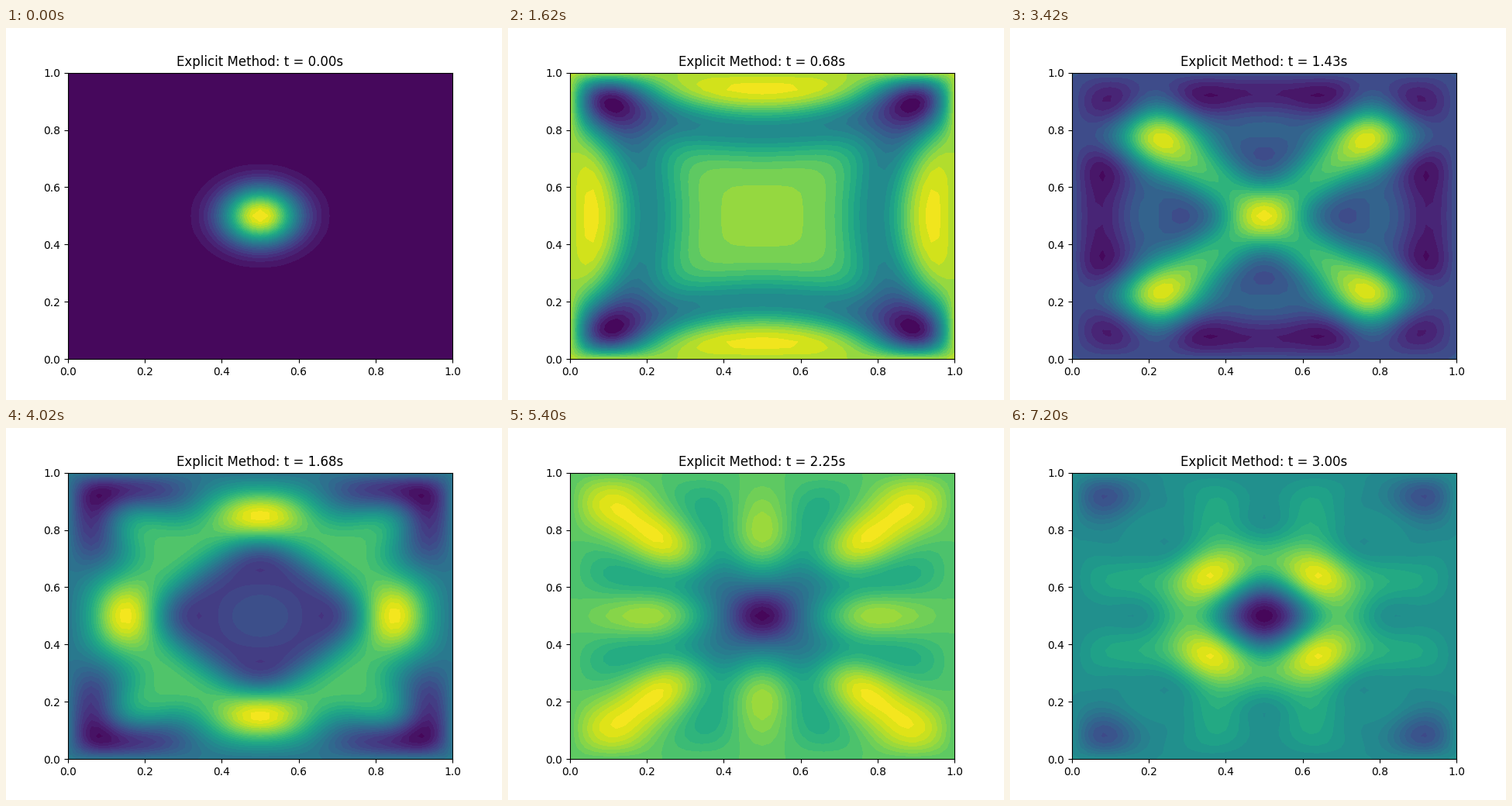
Recreate the animation shown at these times as a matplotlib script. Size 640x480 px, loop 7.26 s.

```python
import numpy as np
import matplotlib.pyplot as plt
from matplotlib.animation import FuncAnimation

N = 51            # grid points per side
DT = 0.005        # solver time step
SKIP = 5          # solver steps per picture
FRAMES = 121
LEVELS = 30

x = np.linspace(0, 1, N)
X, Y = np.meshgrid(x, x)
R2 = (DT / (x[1] - x[0])) ** 2


def laplacian(u):
    out = np.zeros_like(u)
    out[1:-1, 1:-1] = (u[2:, 1:-1] + u[:-2, 1:-1] + u[1:-1, 2:]
                       + u[1:-1, :-2] - 4 * u[1:-1, 1:-1])
    return out


def solve():
    """Explicit scheme for the wave equation with fixed edges."""
    u = np.exp(-100 * ((X - 0.5) ** 2 + (Y - 0.5) ** 2))
    prev = u + 0.5 * R2 * laplacian(u)
    states = [u]
    for n in range(1, (FRAMES - 1) * SKIP + 1):
        u, prev = 2 * u - prev + R2 * laplacian(u), u
        if n % SKIP == 0:
            states.append(u)
    return states


states = solve()
fig, ax = plt.subplots(figsize=(6.4, 4.8), dpi=100)


def draw(i):
    ax.clear()
    ax.contourf(X, Y, states[i], levels=LEVELS, cmap="viridis")
    ax.set_title(f"Explicit Method: t = {i * SKIP * DT:.2f}s")


anim = FuncAnimation(fig, draw, frames=FRAMES, init_func=lambda: None,
                     interval=60, repeat=True, repeat_delay=0)
plt.show()
```
